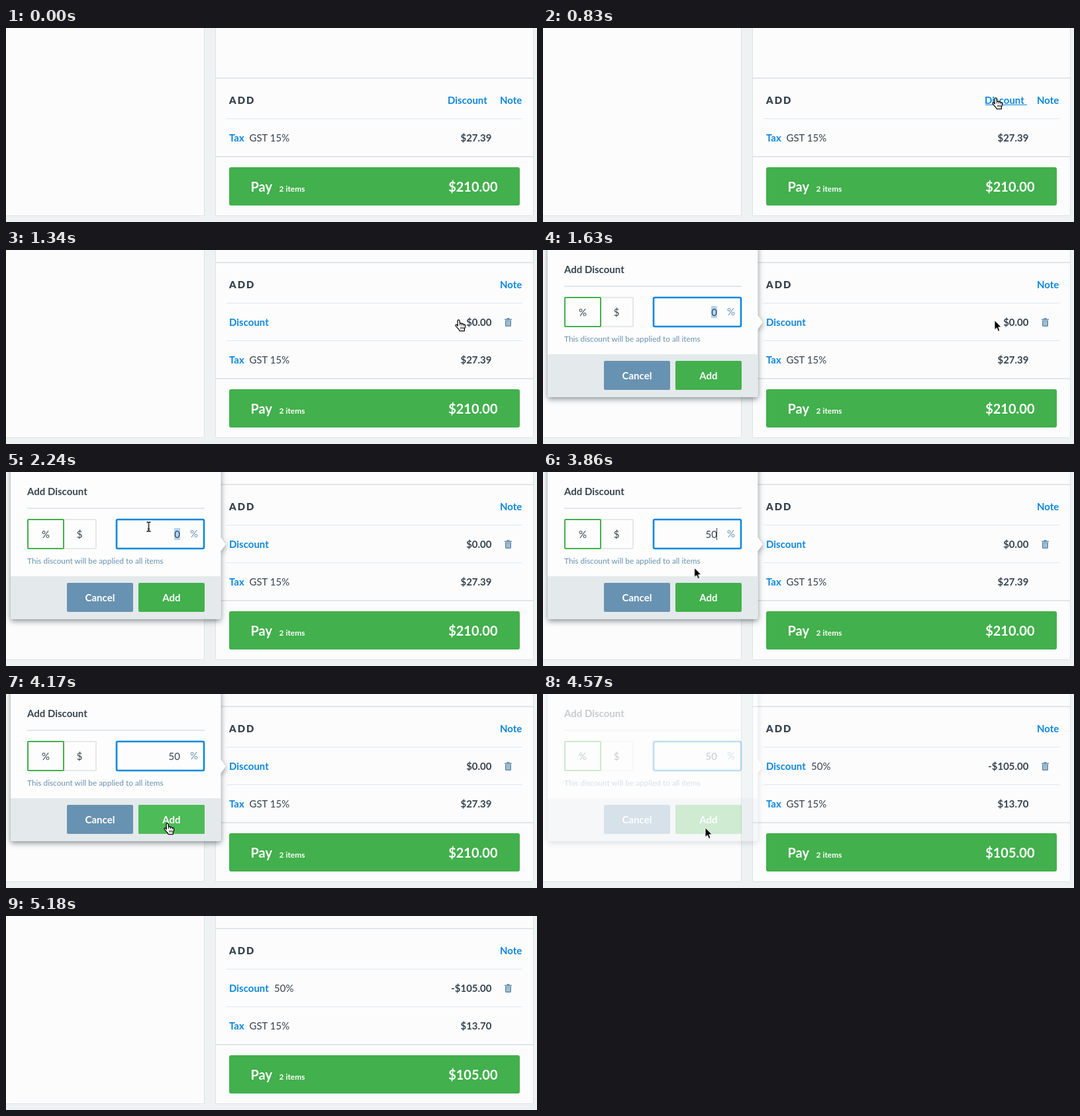
Recreate the animation shown at these times as an HTML page. Size 802 by 294 pixels, loop 6560 ms.

```html
<!DOCTYPE html>
<html lang="en">
<head>
<meta charset="utf-8">
<title>Add a discount</title>
<style>
  html, body { margin: 0; width: 100%; height: 100%; overflow: hidden; background: #eef2f3; }
  svg { display: block; width: 802px; height: 294px; }

  text { font: 400 15px Lato, sans-serif; fill: #36434d; white-space: pre; }
  .bold { font-weight: 700; }
  .caps { font-weight: 900; letter-spacing: 2px; }
  .blue { font-weight: 700; fill: #0d87dd; }
  .small { font-size: 12px; }
  .note { font-size: 11.85px; }
  .big { font-size: 20px; }
  .white { font-weight: 700; fill: #fff; }
  .soft { fill: #6892b1; }
  .end { text-anchor: end; }
  .mid { text-anchor: middle; }

  .panel { fill: #fcfcfd; stroke: #dce2e4; }
  .rule { fill: #e1e7e9; }
  .green { fill: #42b04c; }

  /* Every track shares one 6560 ms clock; percentages are ms / 65.6. */
  .t { animation: 6560ms step-end infinite; }
  .popup { animation: popup 6560ms linear infinite; filter: drop-shadow(0 3px 4px rgba(25, 38, 46, .5)); }
  .cursor { animation: move 6560ms linear infinite; }
  .head { animation-name: raise; }
  .link { animation-name: link; }
  .underline { animation-name: underline; }
  .row { animation-name: row; }
  .before { animation-name: before; }
  .after { animation-name: after; }
  .zero { animation-name: zero; }
  .five { animation-name: five; }
  .fifty { animation-name: fifty; }
  .caret { animation-name: caret; }
  .hover { animation-name: hover; }
  .arrow { animation-name: arrow; }
  .hand { animation-name: hand; }
  .beam { animation-name: beam; }

  @keyframes raise { 0% { transform: none } 20.42%, 100% { transform: translateY(-57px) } }
  @keyframes link { 0% { opacity: 1 } 20.42%, 100% { opacity: 0 } }
  @keyframes underline { 0%, 20.42%, 100% { opacity: 0 } 10.06% { opacity: 1 } }
  @keyframes row { 0% { opacity: 0 } 20.42%, 100% { opacity: 1 } }
  @keyframes before { 0% { opacity: 1 } 68.44%, 100% { opacity: 0 } }
  @keyframes after { 0% { opacity: 0 } 68.44%, 100% { opacity: 1 } }
  @keyframes popup {
    0%, 20.88% { opacity: 0 }
    24.39%, 68.44% { opacity: 1 }
    70.12%, 100% { opacity: 0 }
  }
  @keyframes zero { 0% { opacity: 1 } 39.17%, 100% { opacity: 0 } }
  @keyframes five { 0%, 53.81%, 100% { opacity: 0 } 39.17% { opacity: 1 } }
  @keyframes fifty { 0% { opacity: 0 } 53.81%, 100% { opacity: 1 } }
  @keyframes caret { 0%, 46.18%, 61.43%, 100% { opacity: 0 } 39.17%, 53.81% { opacity: 1 } }
  @keyframes hover { 0%, 100% { opacity: 0 } 60.67% { opacity: 1 } }

  @keyframes arrow {
    0%, 10.06%, 30.79%, 60.67%, 78.96%, 100% { opacity: 0 }
    7.77%, 21.34%, 58.38%, 69.35% { opacity: 1 }
  }
  @keyframes hand { 0%, 21.34%, 69.35%, 100% { opacity: 0 } 10.06%, 60.67% { opacity: 1 } }
  @keyframes beam { 0%, 58.38%, 100% { opacity: 0 } 30.79% { opacity: 1 } }

  @keyframes move {
    0% { transform: translate(802px, 136px) }
    7.3% { transform: translate(802px, 136px); animation-timing-function: ease-out }
    12.64%, 24.85% { transform: translate(682px, 106.5px) }
    25.15% { transform: translate(682px, 106.5px); animation-timing-function: cubic-bezier(.4, 0, .8, .8) }
    30.03% { transform: translate(314px, 83px); animation-timing-function: ease-out }
    34.14%, 43.6% { transform: translate(215.5px, 83px) }
    46.18%, 50.29% { transform: translate(213.5px, 86px) }
    50.3% { transform: translate(213.5px, 87px) }
    53.81% { transform: translate(213.5px, 87px); animation-timing-function: ease-in-out }
    63.56%, 63.8% { transform: translate(242px, 196.5px) }
    64.93% { transform: translate(245px, 202.5px) }
    75.2% { transform: translate(245px, 202.5px); animation-timing-function: ease-in }
    78.96%, 100% { transform: translate(239px, 298px) }
  }
</style>
</head>
<body>
<svg viewBox="0 0 802 294">
  <defs>
    <path id="ibeam" d="M-3-7H-1.5L0-6L1.5-7H3M0-6V6M-3 7H-1.5L0 6L1.5 7H3M-1.5 3.5H1.5"/>
  </defs>

  <rect class="panel" x="-9.5" y="-9.5" width="309" height="294" rx="2"/>
  <rect class="panel" x="316.5" y="-9.5" width="480" height="294" rx="1"/>

  <g class="t head">
    <rect class="rule" x="317" y="75" width="479" height="2"/>
    <text class="caps" x="337" y="115">ADD</text>
    <g class="t link">
      <text class="blue" x="667" y="115">Discount</text>
      <rect class="t underline" x="668" y="116" width="63" height="1" fill="#0d87dd"/>
    </g>
    <text class="blue end" x="779.3" y="115">Note</text>
    <rect class="rule" x="333" y="137" width="447" height="1"/>
  </g>

  <g class="t row">
    <text class="blue" x="337" y="115">Discount</text>
    <text class="bold end t before" x="733.5" y="115">$0.00</text>
    <g class="t after">
      <text x="405" y="115">50%</text>
      <text class="bold end" x="733.5" y="115">-$105.00</text>
    </g>
    <path class="soft" d="M753 104.5h3.5v-1.5h4v1.5h3.5v1.5h-11zM754 106.5h9v8q0 1.5-1.5 1.5h-6q-1.5 0-1.5-1.5z"/>
    <path d="M756.5 107.5v7M758.5 107.5v7M760.5 107.5v7" stroke="#dbe5ec"/>
    <rect class="rule" x="333" y="137" width="447" height="1"/>
  </g>

  <text class="blue" x="337" y="172">Tax</text>
  <text x="367.5" y="172">GST 15%</text>
  <rect class="rule" x="317" y="194" width="479" height="2"/>
  <rect class="green" x="337" y="211" width="439" height="58" rx="3"/>
  <text class="white big" x="369.5" y="248">Pay</text>
  <text class="white small" x="412.5" y="248">2 items</text>
  <g class="t before">
    <text class="bold end" x="733.5" y="172">$27.39</text>
    <text class="white big end" x="742.5" y="248">$210.00</text>
  </g>
  <g class="t after">
    <text class="bold end" x="733.5" y="172">$13.70</text>
    <text class="white big end" x="742.5" y="248">$105.00</text>
  </g>

  <g class="popup">
    <path fill="#fdfdfd" d="M7-10H324.5V99L332 109.5L324.5 120V220q0 3-3 3H10q-3 0-3-3z"/>
    <path fill="#e4e9eb" d="M7 158H324.5V220q0 3-3 3H10q-3 0-3-3z"/>
    <text class="bold" x="32" y="35">Add Discount</text>
    <rect class="rule" x="32" y="54" width="268" height="2"/>

    <g fill="none" stroke-width="2">
      <rect x="87" y="72" width="49" height="44" rx="1" stroke="#e6e8e9"/>
      <rect x="33" y="72" width="54" height="44" rx="1" stroke="#42b04c"/>
      <rect x="167" y="72" width="132" height="44" rx="2" stroke="#0d87dd" stroke-width="2.6"/>
    </g>
    <text class="mid" x="60" y="100">%</text>
    <text class="mid" x="111" y="100">$</text>

    <g class="t zero">
      <rect x="254" y="85" width="9" height="18" fill="#b1d3f6"/>
      <text class="end" x="263" y="100">0</text>
    </g>
    <text class="end t five" x="263" y="100">5</text>
    <text class="end t fifty" x="263" y="100">50</text>
    <rect class="t caret" x="262" y="85" width="1" height="18" fill="#36434d"/>
    <text class="soft" x="278" y="99">%</text>

    <text class="note soft" x="32" y="139">This discount will be applied to all items</text>
    <rect class="soft" x="92" y="168" width="100" height="44" rx="2"/>
    <rect class="green" x="200" y="168" width="100" height="44" rx="2"/>
    <rect class="t hover" x="200" y="168" width="100" height="44" rx="2" fill="#4dbb58"/>
    <text class="white mid" x="142" y="196">Cancel</text>
    <text class="white mid" x="250" y="196">Add</text>
  </g>

  <g class="cursor">
    <path class="t arrow" d="M0 0V14.5L3.3 11.5L5.5 16.7L8 15.6L5.8 10.5H10.3Z" stroke="#fff"/>
    <g class="t hand" stroke="#000" stroke-linejoin="round">
      <g transform="translate(-4 -1.5) scale(1.05)">
        <path fill="#fff" stroke-width="1.2" d="M4.2 9.5L3.8 2.5Q4 .8 5.3 .8Q6.5 .8 6.8 2.5L7.3 6.2Q8.2 5.2 9.6 5.8L10 6.7Q11.3 5.9 12.4 7L12.7 7.7Q14.8 7.2 15 9Q15.2 11.5 13.7 14.2V16.7H6.8Q6.3 14.6 4 12.8L1.2 9.6Q.6 8.2 1.8 7.8Q3 7.6 4.2 9.5Z"/>
        <path d="M7.3 6v3M10 6.7v2.5M12.6 7.7v2M8.5 11v3M10.5 11v3M12.5 11v3" stroke-width=".9"/>
      </g>
    </g>
    <g class="t beam" fill="none">
      <use href="#ibeam" stroke="#fff" stroke-width="2.6"/>
      <use href="#ibeam" stroke="#000" stroke-width="1.4"/>
    </g>
  </g>
</svg>
</body>
</html>
```
